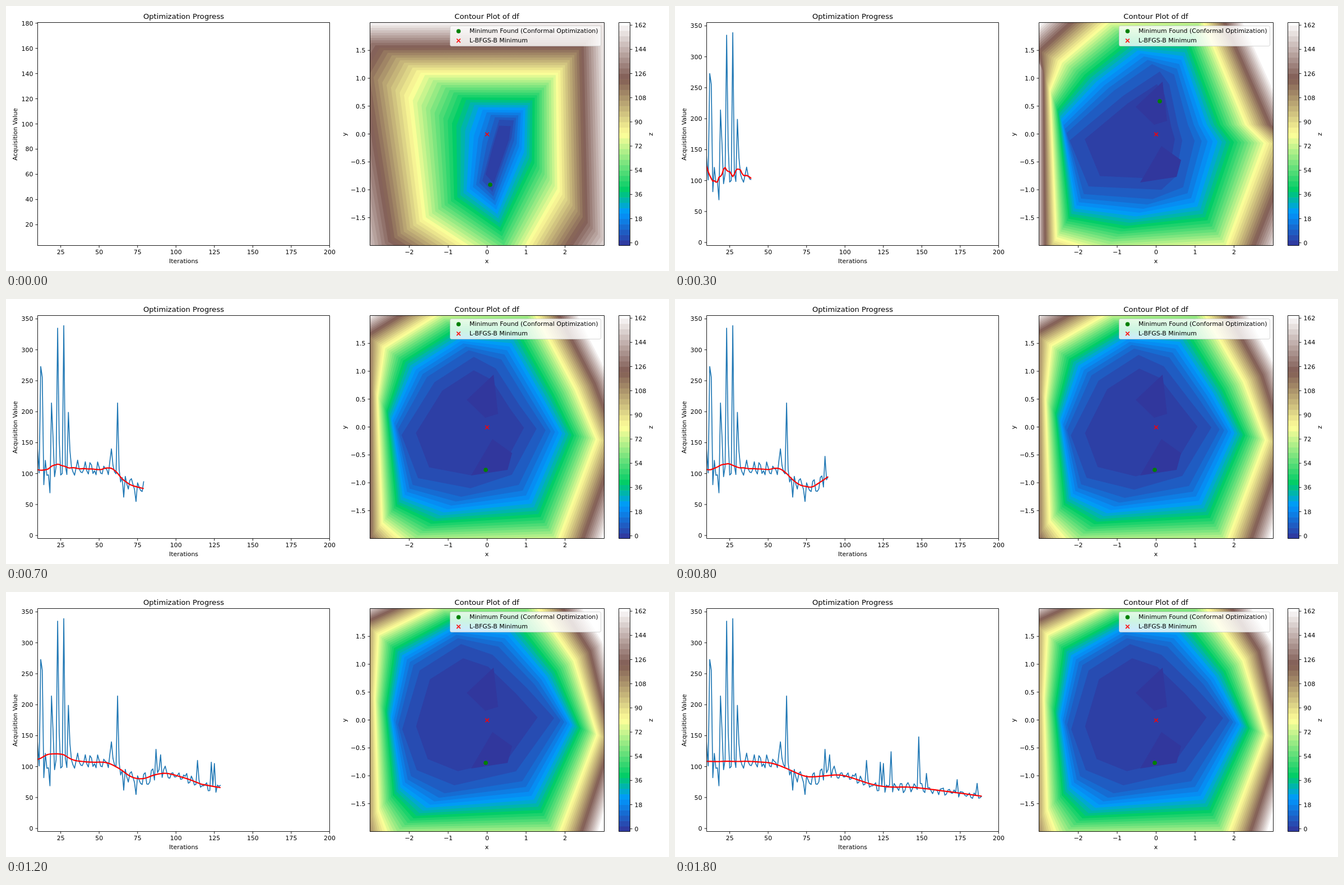
These frames come from a looping animation (1183 by 473 pixels, 1.9 s). An HTML page with a canvas:

```html
<!DOCTYPE html>
<html lang="en">
<head>
<meta charset="utf-8">
<title>Optimization Progress</title>
<style>
  html, body { margin: 0; overflow: hidden; background: #fff; }
  canvas { display: block; }
</style>
</head>
<body>
<canvas id="stage" width="1183" height="473"></canvas>
<script>
const ctx = document.getElementById('stage').getContext('2d');
const STEP = 100, STEPS = 19;
const TOP = 29.5, BOTTOM = 427.5;
const LEFT_AXES = [56.5, 577.5], RIGHT_AXES = [649.5, 1067.5], BAR = [1093.5, 1113.5];

const mix = (a, b, u) => a.map((v, i) => v + (b[i] - v) * u);
// Piecewise linear lookup; each stop is [position, ...values]
function along(stops, t) {
  const i = Math.max(1, stops.findIndex(stop => stop[0] >= t));
  const a = stops[i - 1], b = stops[i];
  return mix(a, b, (t - a[0]) / (b[0] - a[0])).slice(1);
}

// Acquisition values: a falling trend with noise and a few outliers
const trend = [[0, 105], [58, 108], [76, 74], [92, 92], [125, 66], [148, 66], [190, 50]];
const outliers = { 0: 11.5, 9: 172.5, 10: 136, 12: 273, 13: 256, 14: 82, 18: 69, 19: 214, 20: 158,
  23: 335, 24: 156, 27: 339, 30: 199, 31: 137, 58: 140, 62: 214, 66: 62, 74: 55, 87: 128, 90: 119,
  114: 110, 123: 107, 125: 105, 130: 124, 148: 148, 153: 89, 173: 79, 186: 73 };
const values = Array.from({ length: 190 }, (_, i) => {
  const noise = Math.sin(i * 127.1) * 43758.5 % 1;
  return outliers[i] ?? along(trend, i)[0] + noise * (18 - i * 0.07);
});

// Robust locally weighted regression over the nearest fifth of the points
function lowess(data) {
  const n = data.length, k = Math.floor(n * 0.2 + 1e-9);
  let robust = data.map(() => 1), fit;
  for (let pass = 0; pass < 4; pass++) {
    fit = data.map((y, i) => {
      const left = Math.min(n - k, Math.max(0, Math.ceil(i - k / 2)));
      const radius = Math.max(i - left, left + k - 1 - i);
      let s = 0, sx = 0, sy = 0, sxx = 0, sxy = 0;
      for (let j = left; j < left + k; j++) {
        const d = j - i, w = robust[j] * (1 - Math.min(1, Math.abs(d) / radius) ** 3) ** 3;
        s += w; sx += w * d; sy += w * data[j]; sxx += w * d * d; sxy += w * d * data[j];
      }
      if (s < 1e-9) return y;
      const det = s * sxx - sx * sx;
      return det < 1e-9 ? sy / s : (sxx * sy - sx * sxy) / det;
    });
    const residuals = data.map((y, i) => Math.abs(y - fit[i]));
    const sorted = [...residuals].sort((a, b) => a - b);
    const scale = 3 * (sorted[(n - 1) >> 1] + sorted[n >> 1]) || 1;
    robust = residuals.map(r => (1 - Math.min(1, r / scale) ** 2) ** 2);
  }
  return fit;
}

// A surface is a set of spokes [x, y, x, y]: a contour corner on the valley floor and at mid height.
// The bow sets how the slope steepens outward.
const FLOOR = 6, MIDDLE = 81;
const narrow = { bow: 1, best: [864, 319], spokes: [
  [880, 203, 742, 120], [906, 204, 984, 120], [902, 235, 987, 330],
  [868, 332, 900, 480], [850, 312, 745, 380], [866, 250, 720, 165]] };
const tilted = { bow: 0.75, best: [868, 175], spokes: [
  [850, 172, 728, 97], [880, 178, 960, 105], [912, 213, 1010, 150], [908, 222, 1053, 246],
  [872, 330, 985, 435], [842, 332, 760, 440], [728, 302, 680, 410], [727, 280, 672, 140]] };
const notched = { bow: 0.65, best: [865, 170], spokes: [
  [800, 160, 688, 100], [865, 117, 772, 28], [882, 140, 940, 20],
  [897, 212, 1020, 212], [905, 240, 1054, 245], [893, 305, 985, 430],
  [868, 328, 760, 440], [738, 322, 680, 415], [704, 240, 669, 150]] };
const round = { bow: 0.65, best: [856, 305], spokes: [
  [738, 140, 664, 76], [812, 93, 775, 22], [868, 112, 940, 15],
  [930, 172, 1014, 122], [978, 225, 1055, 255], [910, 320, 985, 440],
  [800, 345, 682, 440], [733, 318, 664, 390], [707, 245, 658, 190]] };
const pits = [
  [[870, 135], [878, 205], [855, 212], [822, 180]],
  [[868, 250], [903, 275], [895, 305], [830, 315]]];

function surfaceAt(step) {
  if (step < 2) return step ? tilted : narrow;
  const u = Math.min(1, Math.max(0, (step - 3) / 7));
  return {
    bow: round.bow,
    best: u < 0.2 ? notched.best : round.best,
    spokes: notched.spokes.map((spoke, i) => mix(spoke, round.spokes[i], u))
  };
}
const contour = ({ bow, spokes }, z) => spokes.map(([x0, y0, x1, y1]) =>
  mix([x0, y0], [x1, y1], ((z - FLOOR) / (MIDDLE - FLOOR)) ** bow));

// Terrain colour map over the range -2 to 164
const terrain = [[0, 51, 51, 153], [0.15, 0, 153, 255], [0.25, 0, 204, 102],
  [0.5, 255, 255, 153], [0.75, 128, 92, 84], [1, 255, 255, 255]];
const colour = z => `rgb(${along(terrain, Math.min(1, (z + 2) / 166)).map(Math.round)})`;

function trace(points) {
  ctx.beginPath();
  points.forEach(p => ctx.lineTo(...p));
}
function polygon(points, fill) {
  trace(points);
  ctx.fillStyle = fill;
  ctx.fill();
}
function polyline(points, stroke, width) {
  trace(points);
  ctx.strokeStyle = stroke;
  ctx.lineWidth = width;
  ctx.lineJoin = 'round';
  ctx.stroke();
}
function text(label, x, y, align = 'center', size = 10.95) {
  ctx.font = `${size}px "DejaVu Sans", sans-serif`;
  ctx.textAlign = align;
  ctx.fillStyle = '#000';
  ctx.fillText(label, x, y);
}
function sideText(label, x, y) {
  ctx.save();
  ctx.translate(x, y);
  ctx.rotate(-Math.PI / 2);
  text(label, 0, 0);
  ctx.restore();
}
const number = (v, digits = 0) => v.toFixed(digits).replace('-', '\u2212');
function xTick(x, label) {
  polyline([[x, BOTTOM], [x, BOTTOM + 4]], '#000', 0.9);
  text(label, x, 443);
}
function yTick(x, y, label, side = -1) {
  polyline([[x, y], [x + 4 * side, y]], '#000', 0.9);
  text(label, x + 8 * side, y + 4, side < 0 ? 'right' : 'left');
}
function box(x0, x1) {
  ctx.strokeStyle = '#000';
  ctx.lineWidth = 0.9;
  ctx.strokeRect(x0, TOP, x1 - x0, BOTTOM - TOP);
}
function clipped(x0, x1, draw) {
  ctx.save();
  ctx.beginPath();
  ctx.rect(x0, TOP, x1 - x0, BOTTOM - TOP);
  ctx.clip();
  draw();
  ctx.restore();
}
function dot(x, y) {
  ctx.beginPath();
  ctx.arc(x, y, 3.8, 0, 7);
  ctx.fillStyle = '#008000';
  ctx.fill();
}
function cross(x, y) {
  for (const s of [-3.3, 3.3]) polyline([[x - 3.3, y - s], [x + 3.3, y + s]], '#f00', 1.6);
}

function drawProgress(step) {
  const data = values.slice(0, step * 10 + 10);
  const min = Math.min(...data), max = Math.max(...data), pad = (max - min) * 0.05;
  const px = i => LEFT_AXES[0] + (i - 10) * (LEFT_AXES[1] - LEFT_AXES[0]) / 190;
  const py = v => BOTTOM - (v - min + pad) * (BOTTOM - TOP) / (max - min + 2 * pad);
  const curve = list => list.map((v, i) => [px(i), py(v)]);
  if (step) clipped(...LEFT_AXES, () => {
    polyline(curve(data), '#1f77b4', 1.65);
    polyline(curve(lowess(data)), '#f00', 2.2);
  });
  box(...LEFT_AXES);
  for (let i = 25; i <= 200; i += 25) xTick(px(i), number(i));
  const gap = step ? 50 : 20;
  for (let v = step ? 0 : gap; v <= max + pad; v += gap) yTick(LEFT_AXES[0], py(v), number(v));
  text('Optimization Progress', 317, 23, 'center', 13.14);
  text('Iterations', 317, 459);
  sideText('Acquisition Value', 20, 229);
}

function drawLegend() {
  ctx.beginPath();
  ctx.roundRect(792.5, 35.5, 269, 36, 2.5);
  ctx.fillStyle = 'rgba(255,255,255,0.8)';
  ctx.fill();
  ctx.strokeStyle = 'rgba(204,204,204,0.8)';
  ctx.lineWidth = 1;
  ctx.stroke();
  dot(807.5, 45);
  cross(807.5, 61.8);
  text('Minimum Found (Conformal Optimization)', 827, 48.3, 'left');
  text('L-BFGS-B Minimum', 827, 65, 'left');
}

function drawContours(step) {
  const surface = surfaceAt(step);
  clipped(...RIGHT_AXES, () => {
    ctx.fillStyle = colour(164);
    ctx.fillRect(649, 29, 419, 399);
    for (let z = 162; z >= FLOOR; z -= 4) polygon(contour(surface, z), colour(z - 2));
    const floor = contour(surface, FLOOR);
    const centre = [0, 1].map(axis => floor.reduce((sum, p) => sum + p[axis], 0) / floor.length);
    polygon(floor.map(p => mix(centre, p, 0.8)), colour(1));
    if (step > 1) pits.forEach(pit => polygon(pit, colour(-1)));
  });
  dot(...surface.best);
  cross(858.5, 229);
  box(...RIGHT_AXES);
  for (let v = -2; v <= 2; v++) xTick(858.5 + v * 69.5, number(v));
  for (let v = -1.5; v <= 1.5; v += 0.5) yTick(RIGHT_AXES[0], 228.5 - v * 99.5, number(v, 1));
  text('Contour Plot of df', 858, 23, 'center', 13.14);
  text('x', 858, 459);
  sideText('y', 608, 229);
  drawLegend();
}

function drawColourBar() {
  const py = z => 422.7 - z * 2.398;
  clipped(...BAR, () => {
    for (let z = -2; z < 164; z += 4) {
      ctx.fillStyle = colour(z + 2);
      ctx.fillRect(BAR[0], py(z + 4), 20, 10.2);
    }
  });
  box(...BAR);
  for (let z = 0; z <= 162; z += 18) yTick(BAR[1], py(z), number(z), 1);
  sideText('z', 1154, 229);
}

let shown = -1;
function tick() {
  const step = Math.floor(performance.now() / STEP) % STEPS;
  if (step !== shown) {
    shown = step;
    ctx.fillStyle = '#fff';
    ctx.fillRect(0, 0, 1183, 473);
    drawProgress(step);
    drawContours(step);
    drawColourBar();
  }
  requestAnimationFrame(tick);
}
tick();
</script>
</body>
</html>
```
